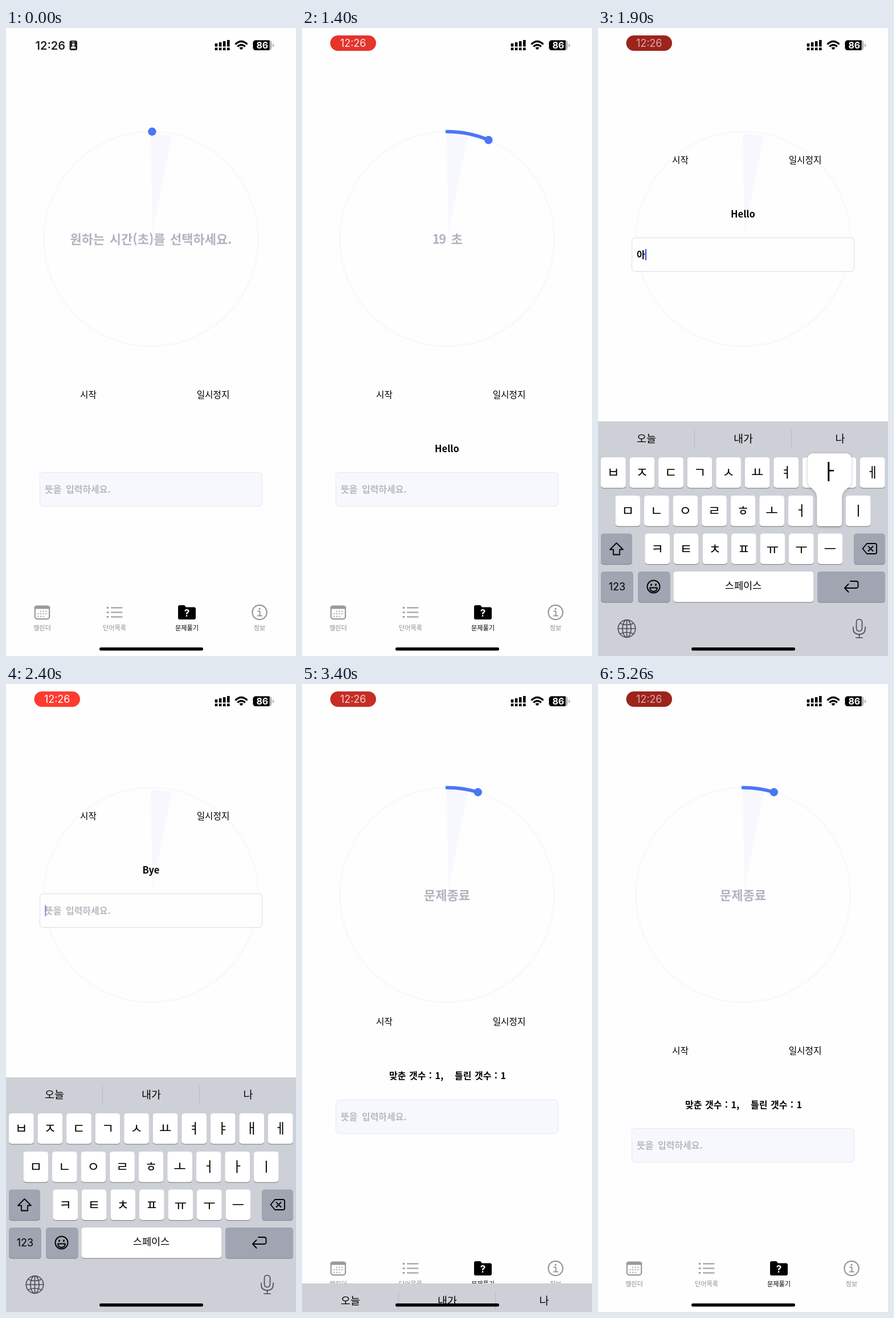
Write an HTML page that moves like this. It is 509 px wide and 1100 px high and loops after 5.43 s.

```html
<!DOCTYPE html>
<html lang="ko">
<head>
<meta charset="utf-8">
<title>단어 퀴즈</title>
<style>
html, body { margin: 0; width: 100%; height: 100%; overflow: hidden; background: #fefefe; }
svg { display: block; width: 100vw; height: 100vh; }
text { font-family: "Noto Sans CJK KR", "Noto Sans CJK", sans-serif; white-space: pre; }
.latin { font-family: Inter, sans-serif; }
.mid { text-anchor: middle; }
.bold { font-weight: 700; }
.btn { font-size: 15.7px; }
.tab { font-size: 11.2px; fill: #8e8e93; }
.hint { font-size: 16px; font-weight: 700; word-spacing: 3px; fill: #b9b9c3; }
.line { fill: none; stroke-linecap: round; stroke-linejoin: round; }
</style>
</head>
<body>
<svg viewBox="0 0 509 1100" preserveAspectRatio="none">
  <defs>
    <filter id="soft" x="-30%" y="-20%" width="160%" height="140%">
      <feDropShadow dx="0" dy="1" stdDeviation="2.5" flood-color="#000" flood-opacity=".28"/>
    </filter>
  </defs>
  <rect width="509" height="1100" fill="#fefefe"/>

  <circle cx="254.5" cy="369.5" r="188" fill="none" stroke="#f7f7fa" stroke-width="2"/>
  <path d="M254 186Q275 184 291 190L257 358Z" fill="#f7f8fe"/>
  <g id="dial">
    <path id="arc" class="line" stroke="#4b76f6" stroke-width="6"/>
    <circle id="knob" r="7.2" fill="#4b76f6"/>
    <text id="label" class="mid bold" x="254.5" y="378" font-size="22" fill="#b4b1c0"/>
  </g>

  <g id="tabs">
    <g class="line" stroke="#999" stroke-width="2.2">
      <rect x="50.8" y="1012.5" width="25.4" height="22.6" rx="4"/>
      <path d="M52 1015H75" stroke-width="5"/>
      <path id="days" stroke-width="2.2"/>
      <path d="M185 1015.5H203.500M185 1023.500H203.500M185 1031.500H203.500"/>
      <path d="M178.500 1015.500h.01M178.500 1023.500h.01M178.500 1031.500h.01" stroke-width="3.6"/>
      <circle cx="445" cy="1023.500" r="12.700"/>
      <path d="M442.500 1021.500H445.500V1029.500M442 1029.500H449"/>
      <path d="M445 1017.300h.01" stroke-width="3.200"/>
    </g>
    <path d="M302 1014q0-3 3-3h8l3 3.500h14q3 0 3 3v15.500q0 3-3 3h-25q-3 0-3-3z"/>
    <text class="latin mid bold" x="317.500" y="1031" font-size="17" fill="#fff">?</text>
    <text class="tab mid" x="63.500" y="1055">캘린더</text>
    <text class="tab mid" x="190.500" y="1055">단어목록</text>
    <text class="tab mid" x="317.500" y="1055" style="fill:#000;font-weight:500">문제풀기</text>
    <text class="tab mid" x="445" y="1055">정보</text>
  </g>

  <g id="form">
    <text id="start" class="btn mid" x="144.500" y="647.500">시작</text>
    <text class="btn mid" x="363.500" y="647.500">일시정지</text>
    <text id="word" class="mid bold" x="254.500" y="743" font-size="16.500"/>
    <g id="score" class="bold" font-size="16" style="word-spacing:1px">
      <text x="153" y="742.500">맞춘 갯수 : 1,</text>
      <text x="268" y="742.500">틀린 갯수 : 1</text>
    </g>
    <rect id="field" x="59.500" y="778.500" width="390" height="59" rx="5.500"/>
    <text id="hint" class="hint" x="68" y="814">뜻을 입력하세요.</text>
    <text id="typed" class="bold" x="68" y="814" font-size="16"/>
    <rect id="caret" y="798" width="2.400" height="20" rx="1" fill="#4763e0"/>
  </g>

  <g id="board">
    <rect y="689" width="509" height="420" fill="#cdd0d7"/>
    <path d="M169.500 704V735M339.500 704V735" stroke="#b6b9c0"/>
    <g id="picks" class="mid" font-size="18.500"></g>
    <g id="keys"></g>
    <path id="shift" class="line" d="M32.500 902L44 913.500H38V922.500H27V913.500H21Z" stroke="#000" stroke-width="1.800"/>
    <g class="line" stroke="#000" stroke-width="1.900">
      <path d="M472 903H486q3 0 3 3v12q0 3-3 3H472L464.500 912Z"/>
      <path d="M474.500 908L482.500 916M482.500 908L474.500 916"/>
      <circle cx="97.500" cy="978.500" r="11"/>
      <path d="M91 980.500H104Q103 987 97.500 987T91 980.500Z"/>
      <path d="M93.500 974.500v1.500M101.500 974.500v1.500" stroke-width="2.600"/>
      <path d="M443 969H453q3.500 0 3.500 3.500v5q0 3.500-3.500 3.500H433M439.500 974L433 981L439.500 988"/>
    </g>
    <g class="line" stroke="#4c4e54" stroke-width="1.700">
      <circle cx="50.500" cy="1052" r="15.200"/>
      <ellipse cx="50.500" cy="1052" rx="7.500" ry="15.200"/>
      <path d="M50.500 1037V1067M35.500 1052H65.500M39 1043Q50.500 1048 62 1043M39 1061Q50.500 1056 62 1061"/>
      <rect x="453.500" y="1035.500" width="10" height="21" rx="5"/>
      <path d="M448 1049v3q0 10 10.500 10t10.500-10v-3M458.500 1062V1068M453 1068H464"/>
    </g>
    <text class="latin mid" x="33.500" y="985" font-size="18">123</text>
    <text class="mid" x="255" y="982.500" font-size="17.500">스페이스</text>
    <g id="pops"></g>
  </g>

  <g id="clock">
    <text class="latin" x="51.500" y="38" font-size="20" font-weight="600" fill="#222">12:26</text>
    <rect x="111.500" y="22" width="13.500" height="17" rx="3" fill="#222"/>
    <circle cx="118.200" cy="29" r="2.300" fill="#fff"/>
    <path d="M114 36q0-4 4.200-4t4.200 4zM116 24h4.500v1h-4.500z" fill="#fff"/>
  </g>
  <g id="pill">
    <rect id="pillBg" x="49.500" y="13" width="80.500" height="27" rx="13.500"/>
    <text id="pillText" class="latin mid" x="89.700" y="33" font-size="18" fill="#fff">12:26</text>
  </g>
  <path id="signal"/>
  <g class="line" stroke="#000" stroke-width="3.400" style="stroke-linecap:butt">
    <path d="M402.500 28.500Q413 18.500 423.500 28.500M406.300 32.500Q413 26.500 419.700 32.500"/>
    <path d="M409.500 34.800Q413 32 416.500 34.800L413 38.500Z" fill="#000" stroke="none"/>
  </g>
  <rect x="433.500" y="21.500" width="33" height="17.500" rx="5" fill="#b3b3b5"/>
  <path d="M438.500 21.500H462.500V39H438.500q-5 0-5-5v-7.500q0-5 5-5z"/>
  <path d="M468 27q2.500 1 2.500 3.300t-2.500 3.300z" fill="#b3b3b5"/>
  <text class="latin mid bold" x="449.800" y="36" font-size="16" fill="#fff">86</text>
  <rect x="164" y="1085" width="182" height="5.500" rx="2.700"/>
</svg>
<script>
const $ = id => document.getElementById(id);
const LOOP = 5430, KEYBOARD = 411;
const ROWS = [[5, 752, 'ㅂㅈㄷㄱㅅㅛㅕㅑㅐㅔ'], [30.5, 819, 'ㅁㄴㅇㄹㅎㅗㅓㅏㅣ'], [82.3, 885.5, 'ㅋㅌㅊㅍㅠㅜㅡ']];
const SHIFTED = 'ㅃㅉㄸㄲㅆㅛㅕㅑㅒㅖ';
const DRAG = [.6, 38, 80, 88, 52, 26.4, 24];
// time, typed text, raised keys
const TYPING = [
  [0, '', ''],
  [1800, 'ㅇ', 'ㅇ'], [1900, '아', 'ㅏ'], [2000, '안', 'ㄴ'], [2100, '안ㄴ', 'ㄴ'],
  [2200, '안녀', 'ㅕ'], [2300, '안녕', 'ㅇ'], [2400, '', ''],
  [2700, 'ㅃ', 'ㅃ'], [2800, 'ㅃ', ''], [2900, '빠', 'ㅏ'], [3000, '빵', 'ㅇ'],
  [3100, '빵', 'ㅇㅣ'], [3200, '빠이', 'ㅣ'], [3300, '빠이', ''], [3400, '', '']
];
const PICKS = {
  '': ['오늘', '내가', '나'],
  '안': ['“안”', '안녕', '안녕하세요'],
  '안녕': ['“안녕”', '안녕히', '안녕하세요'],
  '빠': ['“빠”', '빨리', '아빠'],
  '빵': ['“빵”', '짱', '빵'],
  '빠이': ['“빠이”', '바이', '빠이']
};

const spots = {};
const topRow = [];

function keyCap(x, y, w, fill = '#fff') {
  return `<rect x="${x}" y="${y + 1.3}" width="${w}" height="53.5" rx="5" fill="#898b90"/>` +
    `<rect x="${x}" y="${y}" width="${w}" height="53.5" rx="5" fill="${fill}"/>`;
}

function build() {
  let keys = '';
  ROWS.forEach(([left, y, chars], row) => [...chars].forEach((c, i) => {
    const x = left + i * 50.55;
    spots[c] = [x, y];
    if (!row) spots[SHIFTED[i]] = [x, y];
    keys += keyCap(x, y, 43.7) + `<text class="mid jamo" x="${x + 21.8}" y="${y + 35}" font-size="23.5">${c}</text>`;
  }));
  const grey = '#a0a5b1';
  keys += keyCap(5, 885.5, 55, grey) + keyCap(449, 885.5, 55, grey) + keyCap(5, 952, 57, grey) +
    keyCap(70, 952, 56.5, grey) + keyCap(132.3, 952, 246, '#fff') + keyCap(385, 952, 119, grey);
  $('keys').innerHTML = keys;
  topRow.push(...[...document.querySelectorAll('.jamo')].slice(0, 10));

  let bars = '', days = '';
  for (let i = 0; i < 4; i++) {
    const x = 366.7 + i * 7.1, y = 27 - i * 2;
    bars += `M${x} ${y}h4.6V32.5h-4.6zM${x} 34.5h4.6V39h-4.6z`;
  }
  for (let i = 0; i < 12; i++) {
    const col = i % 4, row = i / 4 | 0;
    if (i !== 0 && i !== 11) days += `M${56.5 + col * 4.6} ${1021.5 + row * 4.6}h.01`;
  }
  $('signal').setAttribute('d', bars);
  $('days').setAttribute('d', days);
}

function popup(c) {
  const [x, y] = spots[c], top = y - 74, r = x + 43.7;
  const hl = Math.max(2, x - 16), hr = hl + 76;
  return `<path filter="url(#soft)" fill="#fff" d="M${hl + 10} ${top}H${hr - 10}q10 0 10 10V${top + 46}` +
    `C${hr} ${top + 64} ${r} ${top + 60} ${r} ${top + 79}V${y + 48.5}q0 5-5 5H${x + 5}q-5 0-5-5V${top + 79}` +
    `C${x} ${top + 60} ${hl} ${top + 64} ${hl} ${top + 46}V${top + 10}q0-10 10-10Z"/>` +
    `<text class="mid" x="${(hl + hr) / 2 - .5}" y="${top + 46}" font-size="37">${c}</text>`;
}

// critically damped approach, 0 to 1
const settle = ms => ms <= 0 ? 0 : 1 - (1 + ms * .0455) * Math.exp(-ms * .0455);
const show = (id, on) => $(id).style.display = on ? '' : 'none';
const shiftBy = (id, y) => $(id).setAttribute('transform', `translate(0 ${y})`);

function drawPill(t) {
  const wave = .5 - .5 * Math.cos((t - 1150) / 810 * 2 * Math.PI);
  const light = .59 + .41 * Math.min(1, wave * 1.1);
  show('clock', t < 100);
  show('pill', t >= 100);
  $('pillBg').setAttribute('fill', `rgb(${[255, 59, 48].map(v => v * light | 0)})`);
  $('pillText').setAttribute('opacity', light);
}

function drawDial(t) {
  const done = t >= 3300;
  const angle = done ? 16.8 : t >= 1300 ? 22.8 : DRAG[Math.min(6, t / 100)];
  const a = angle * Math.PI / 180;
  const x = 254.5 + 188 * Math.sin(a), y = 369.5 - 188 * Math.cos(a);
  show('dial', t < 1500 || t >= 3400);
  $('knob').setAttribute('cx', x);
  $('knob').setAttribute('cy', y);
  $('arc').setAttribute('d', t < 100 ? '' : `M254.5 181.5A188 188 0 0 1 ${x} ${y}`);
  const label = $('label');
  label.textContent = t < 100 ? '원하는 시간(초)를 선택하세요.' : done ? '문제종료' : Math.round(angle / 1.2) + ' 초';
  label.style.letterSpacing = t < 100 || done ? '' : '-1.5px';
  label.style.wordSpacing = t < 100 ? '2.5px' : '5px';
}

function drawForm(t, lift, typed) {
  const editing = t >= 1500 && t < 3400;
  shiftBy('form', -lift);
  $('start').setAttribute('opacity', t === 600 ? .3 : 1);
  $('word').textContent = t < 700 || t >= 3300 ? '' : t < 2400 ? 'Hello' : 'Bye';
  show('score', t >= 3300);
  $('field').setAttribute('fill', editing ? '#fefefe' : '#f7f8fe');
  $('field').setAttribute('stroke', editing ? '#dcdde3' : '#e5e6f1');
  show('hint', !typed);
  $('typed').textContent = typed;
  show('caret', editing);
  $('caret').setAttribute('x', 68 + typed.length * 14.7);
  $('caret').setAttribute('opacity', typed ? 1 : Math.min(1, Math.max(0, .5 + .6 * Math.cos((t - 1600) / 655 * 2 * Math.PI))));
}

function drawBoard(t, lift, typed, raised) {
  const upper = t >= 2600 && t < 2800;
  show('board', lift > 0);
  shiftBy('board', KEYBOARD - lift);
  const picks = PICKS[typed] || PICKS[typed[0]] || PICKS[''];
  $('picks').innerHTML = picks.map((s, i) => `<text x="${85 + i * 170}" y="726">${s}</text>`).join('');
  topRow.forEach((key, i) => key.textContent = (upper ? SHIFTED : ROWS[0][2])[i]);
  $('shift').setAttribute('fill', upper ? '#000' : 'none');
  $('keys').querySelectorAll('rect[x="5"][y="885.5"]').forEach(r => r.setAttribute('fill', upper ? '#fff' : '#a0a5b1'));
  $('pops').innerHTML = [...raised].map(popup).join('');
}

function draw(t) {
  const [, typed, raised] = TYPING.filter(s => s[0] <= t).pop();
  let lift = KEYBOARD * (settle(t - 1420) - settle(t - 3320));
  if (lift < .5) lift = 0;
  drawPill(t);
  drawDial(t);
  drawForm(t, lift, typed);
  drawBoard(t, lift, typed, raised);
}

let last = -1;
const origin = performance.now();
function tick() {
  const now = (performance.now() - origin) % LOOP;
  // the picture steps ten times a second, with two longer holds at the end
  const t = now >= 5260 ? 5260 : Math.min(5100, Math.floor(now / 100) * 100);
  if (t !== last) draw(last = t);
  requestAnimationFrame(tick);
}
build();
tick();
</script>
</body>
</html>
```
